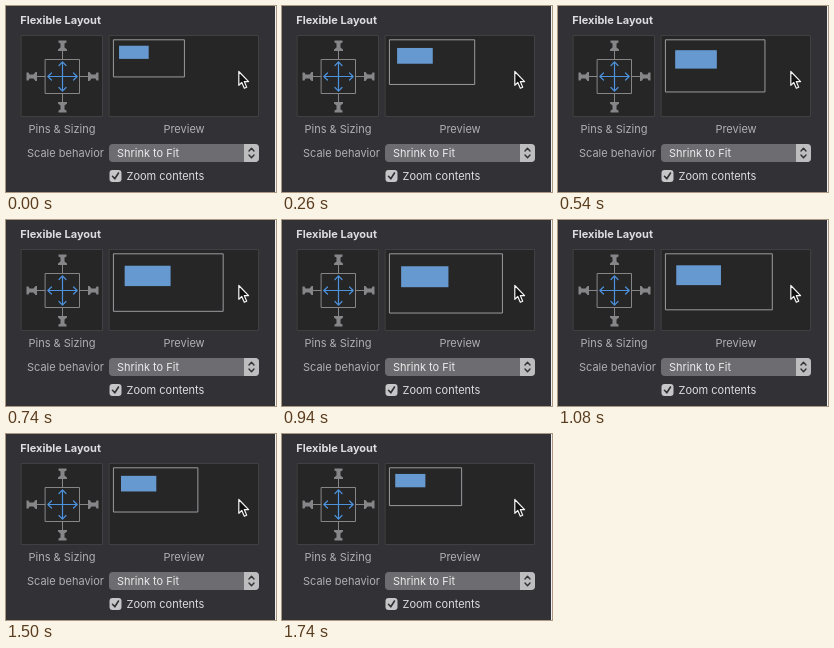
An HTML page with a canvas for the animation above (1.78 s loop, 270 px wide and 186 px high).

```html
<!DOCTYPE html>
<html lang="en">
<head>
<meta charset="utf-8">
<title>Flexible Layout</title>
<style>
html, body { margin: 0; width: 270px; height: 186px; overflow: hidden; background: #323136; }
canvas { display: block; width: 270px; height: 186px; }
</style>
</head>
<body>
<canvas id="stage"></canvas>
<script>
const canvas = document.getElementById('stage');
const ctx = canvas.getContext('2d');
const dpr = window.devicePixelRatio || 1;
canvas.width = 270 * dpr;
canvas.height = 186 * dpr;

const LOOP = 1780, STEP = 40;
const FONT = 'Inter, "Liberation Sans", sans-serif';
const BG = '#323136', PANEL = '#262627', EDGE = '#404042';
const LABEL = '#b0afb3', BRIGHT = '#dddcdf', PIN = '#868588', BLUE = '#4d92dc';

// the width grows and shrinks at one steady pace
function widthAt(t) {
  const step = Math.floor((t + STEP / 2) / STEP);
  return 116.1 - 2.04 * Math.abs(step - 22.3);
}

function text(str, x, y, align, color, weight = 400) {
  ctx.font = `${weight} 11px ${FONT}`;
  ctx.textAlign = align;
  ctx.fillStyle = color;
  ctx.fillText(str, x, y);
}

function rect(x, y, w, h, fill) {
  ctx.fillStyle = fill;
  ctx.fillRect(x, y, w, h);
}

function outline(x, y, w, h, color, width = 1) {
  ctx.strokeStyle = color;
  ctx.lineWidth = width;
  ctx.strokeRect(x, y, w, h);
}

function round(x, y, w, h, r, fill) {
  ctx.fillStyle = fill;
  ctx.beginPath();
  ctx.roundRect(x, y, w, h, r);
  ctx.fill();
}

function stroke(path, color, width) {
  ctx.strokeStyle = color;
  ctx.lineWidth = width;
  ctx.lineCap = ctx.lineJoin = 'round';
  ctx.stroke(new Path2D(path));
}

function panel(x, w) {
  rect(x, 29, w, 82, PANEL);
  outline(x + 0.5, 29.5, w - 1, 81, EDGE);
}

// one side: pushpin and arrow, pointing up
function side(turns) {
  ctx.save();
  ctx.translate(56.5, 70.5);
  ctx.rotate(turns * Math.PI / 2);
  ctx.fillStyle = PIN;
  ctx.fill(new Path2D('M-4-36H4v2l-2 1v4l2.5 2v1.5h-9v-1.5l2.5-2v-4l-2-1z'));
  rect(-0.5, -26, 1, 9, PIN);
  stroke('M0 0V-14.5M-3.5-11L0-14.7L3.5-11', BLUE, 1.2);
  ctx.restore();
}

function pins() {
  panel(15, 82);
  outline(39.5, 53.5, 34, 34, PIN);
  for (let i = 0; i < 4; i++) side(i);
  text('Pins & Sizing', 56, 126.5, 'center', LABEL);
}

function preview(t) {
  const w = widthAt(t);
  panel(103, 150);
  outline(107.8, 33.8, w, w * 0.526, '#9b9a9d');
  rect(102.8 + w * 0.145, 28.8 + w * 0.155, w * 0.42, w * 0.186, '#6699cf');
  text('Preview', 178, 126.5, 'center', LABEL);
}

function controls() {
  text('Scale behavior', 98, 150.5, 'right', LABEL);
  round(103, 138, 150, 18, 4, '#6d6c70');
  round(238, 138, 15, 18, [0, 4, 4, 0], '#bdbcbf');
  stroke('M243 145l2.5-2.7 2.5 2.7M243 149l2.5 2.7 2.5-2.7', BG, 1.4);
  text('Shrink to Fit', 111, 150.5, 'left', '#ebebec');
  round(103.5, 164, 12, 12, 3, '#c6c5c8');
  stroke('M106.5 170.3l2.3 2.5 3.7-5.8', BG, 1.6);
  text('Zoom contents', 120.5, 173.5, 'left', BRIGHT);
}

function cursor() {
  const arrow = 'M232.8 65.5v13.8l3-2.8 2.5 5.8 2.4-1-2.4-5.7h4.3z';
  ctx.fillStyle = '#111';
  ctx.fill(new Path2D(arrow));
  stroke(arrow, '#f4f4f4', 1.2);
}

function draw(t) {
  ctx.setTransform(dpr, 0, 0, dpr, 0, 0);
  rect(0, 0, 270, 186, BG);
  rect(269, 0, 1, 186, '#f0f0f0');
  text('Flexible Layout', 14.3, 17.5, 'left', BRIGHT, 700);
  pins();
  preview(t);
  controls();
  cursor();
}

const start = performance.now();
function tick() {
  draw((performance.now() - start) % LOOP);
  requestAnimationFrame(tick);
}
tick();
</script>
</body>
</html>
```
